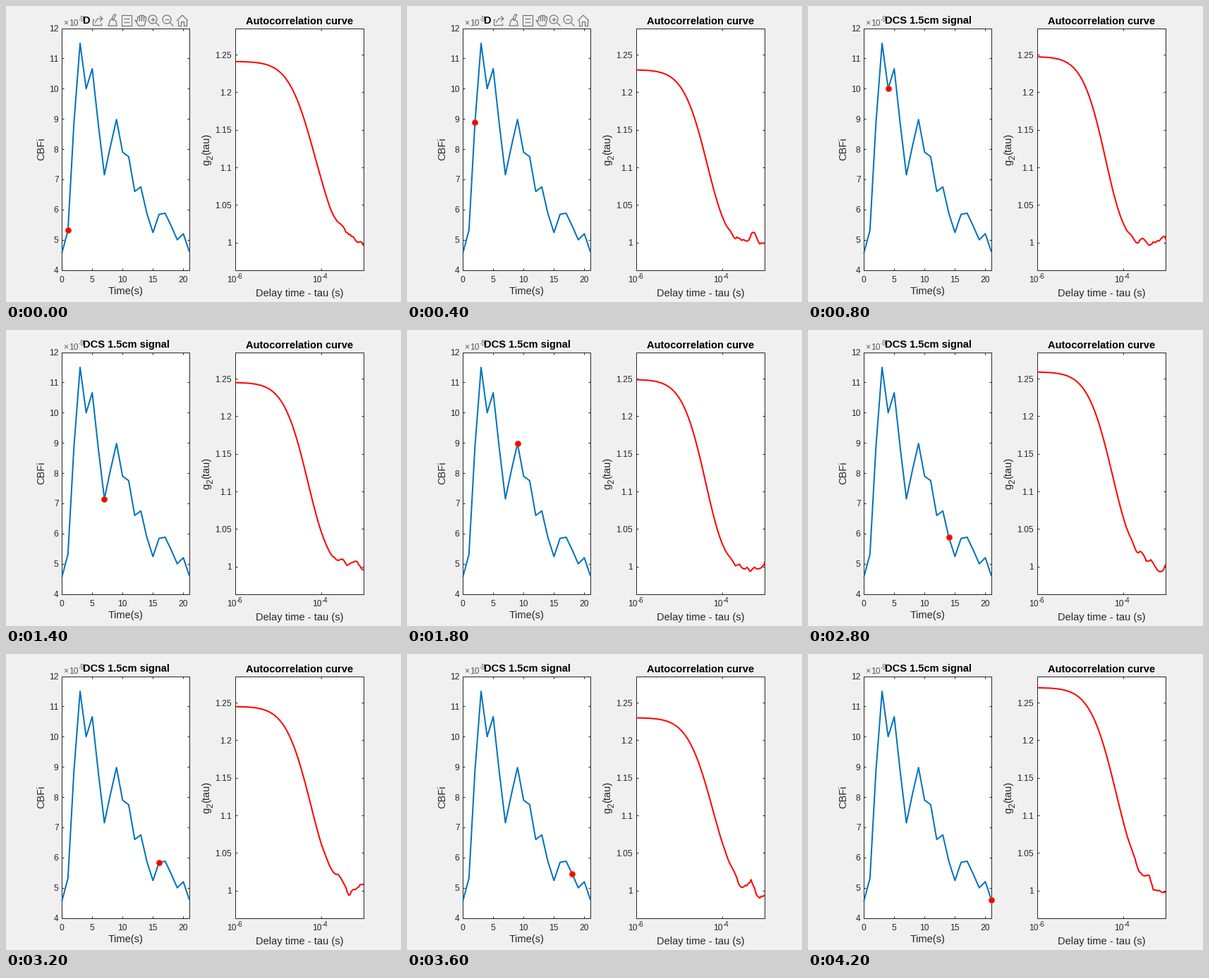
A matplotlib script that plays this animation: 560x420 px, repeating every 4400 ms.

```python
import numpy as np
import matplotlib.pyplot as plt
from matplotlib.animation import FuncAnimation
from matplotlib.patches import Circle, Rectangle

W, H, DPI = 560, 420, 100
PX = 72 / DPI  # points per pixel
STEPS, STEP_MS = 22, 200
GRAY, INK, ICON = "#f0f0f0", "#262626", "#737373"
BLUE, ORANGE = (0, 0.447, 0.741), (0.85, 0.325, 0.098)

plt.rcParams["font.family"] = "Liberation Sans"
plt.rcParams["text.kerning_factor"] = 6
fig = plt.figure(figsize=(W / DPI, H / DPI), dpi=DPI, facecolor=GRAY)
ax = fig.add_axes([0, 0, 1, 1])
ax.set(xlim=(0, W), ylim=(H, 0))
ax.axis("off")

TOP, BOTTOM = 31.6, 374.6

# Blood flow per second, and the contrast of each second's correlation curve
FLOW = np.array([4.56, 5.31, 8.9, 11.5, 10.0, 10.66, 8.82, 7.15, 8.1, 8.98, 7.9,
                 7.75, 6.6, 6.75, 5.87, 5.24, 5.84, 5.88, 5.46, 5.0, 5.2, 4.6])
BETA = np.array([0.24, 0.241, 0.23, 0.25, 0.2475, 0.24, 0.251, 0.245, 0.246, 0.249, 0.242,
                 0.244, 0.285, 0.25, 0.259, 0.26, 0.245, 0.229, 0.23, 0.226, 0.239, 0.27])

# Multi-tau delays in microseconds: eight per octave
TAU = np.concatenate([np.arange(1, 16)]
                     + [np.arange(8, 16) * 2 ** k for k in range(1, 7)] + [[1000]])


def time_x(t):
    return 79.2 + 8.61 * t


def flow_y(v):
    return BOTTOM - (v - 4) * (BOTTOM - TOP) / 8


def tau_x(us):
    return 325.3 + 60.6 * np.log10(us)


def g2_y(v):
    return 335.8 - (v - 1) * 1067


def g2_curve(t):
    """Decay that is faster for higher flow, with noise at long delays."""
    u = np.log(TAU / 37.7)
    rate = 0.079 * FLOW[t] * (1 - 0.16 * np.exp((1 - t) / 2))
    decay = BETA[t] * np.exp(-rate * np.exp(1.243 * u - 0.147 * u ** 2))
    noise = np.random.default_rng(t).normal(0, 0.006, len(TAU))
    noise = np.convolve(noise, np.array([1, 2, 3, 2, 1]) / 19 ** 0.5, "same")
    return 1 + decay + noise * np.clip((np.log10(TAU) - 2) / 0.6, 0, 1)


def line(xs, ys, color=INK, width=1, **kw):
    kw.setdefault("solid_capstyle", "butt")
    return ax.plot(xs, ys, color=color, lw=width * PX, **kw)[0]


def label(x, y, s, size=12, ha="center", color=INK, **kw):
    return ax.text(x, y, s, fontsize=size * PX, ha=ha, va="baseline", color=color,
                   rotation_mode="anchor", **kw)


def panel(x0, x1, xticks, yticks, pad):
    ax.add_patch(Rectangle((x0, TOP), x1 - x0, BOTTOM - TOP, fc="white", ec=INK,
                           lw=PX, joinstyle="miter", zorder=1))
    for x in xticks:
        line([x, x], [BOTTOM, BOTTOM - 3])
        line([x, x], [TOP, TOP + 3])
    for y, s in yticks:
        line([x0, x0 + 3], [y, y])
        line([x1, x1 - 3], [y, y])
        label(x0 - pad, y + 4.5, s, ha="right")


def power(x, y, exponent, color=INK):
    label(x, y, "10", ha="left", color=color)
    label(x + 13.4, y - 5.5, exponent, 9.6, ha="left", color=color)


# Left panel
seconds = range(0, 21, 5)
panel(79, 260, [time_x(t) for t in seconds],
      [(flow_y(v), str(v)) for v in range(4, 13)], 4.4)
for t in seconds:
    label(time_x(t), 391.5, str(t))
label(81, 27.5, "×", ha="left", color="#595959")
power(89.5, 27.5, "-9", "#595959")
label(170, 25.5, "DCS 1.5cm signal", 14.67, color="black", weight="bold")
label(170, 409, "Time(s)", 14.67)
label(54.6, 202.3, "CBFi", 14.67, rotation=90)

# Right panel
panel(325, 507, [tau_x(1), tau_x(100)],
      [(g2_y(v), f"{v:g}") for v in (1, 1.05, 1.1, 1.15, 1.2, 1.25)], 5)
power(313, 392.5, "-6")
power(434, 392.5, "-4")
label(416, 25.5, "Autocorrelation curve", 14.67, color="black", weight="bold")
label(416, 412, "Delay time - tau (s)", 14.67)
label(288, 226, "g", 14.67, ha="left", rotation=90)
label(293, 217.5, "2", 11.7, ha="left", rotation=90)
label(288, 211, "(tau)", 14.67, ha="left", rotation=90)

line(time_x(np.arange(STEPS)), flow_y(FLOW), BLUE, 2, zorder=4, solid_joinstyle="round")
g2 = line([], [], "red", 2, zorder=4, solid_joinstyle="round")
dot = line([], [], marker="o", ms=8 * PX, mfc="red", mec=ORANGE, mew=PX, zorder=5)


def make_toolbar():
    cover = Rectangle((120, 11), 140, 19, fc=GRAY, ec="none", zorder=6)
    parts = [ax.add_patch(cover)]

    def stroke(*pts):
        xs, ys = zip(*pts)
        parts.append(line(xs, ys, ICON, 1.2, zorder=7))

    # export
    stroke((125, 19), (123, 19), (123, 27), (135, 27), (135, 24))
    stroke((126, 24), (130, 18), (136, 18))
    stroke((133, 14), (137, 18), (133, 22))
    # brush
    stroke((156, 12), (153, 19), (150, 18), (153, 12), (156, 12))
    stroke((148, 19), (156, 21), (157, 28), (145, 28), (148, 19))
    # data tip
    stroke((164, 13), (178, 13), (178, 28), (164, 28), (164, 13))
    for y in (18, 23):
        stroke((167, y), (175, y))
    # hand
    for i, tip in enumerate((15, 13, 13, 15)):
        x = 186 + 3 * i
        stroke((x, 21), (x, tip), (x + 3, tip), (x + 3, 21))
    stroke((186, 22), (183, 20), (188, 28), (196, 28), (198, 21))
    # zoom in and out
    for x in (208, 228):
        ring = Circle((x, 19), 6, fc="none", ec=ICON, lw=1.2 * PX, zorder=7)
        parts.append(ax.add_patch(ring))
        stroke((x + 4.5, 23.5), (x + 9.5, 28.5))
        stroke((x - 3, 19), (x + 3, 19))
    stroke((208, 16), (208, 22))
    # home
    stroke((242, 21), (250, 13), (258, 21))
    stroke((244, 20), (244, 28), (248, 28), (248, 22), (252, 22), (252, 28),
           (256, 28), (256, 20))
    return parts


toolbar = make_toolbar()


def draw(k):
    t = max(k, 1)
    g2.set_data(tau_x(TAU), g2_y(g2_curve(t)))
    dot.set_data([time_x(t)], [flow_y(FLOW[t])])
    alpha = 1 if k < 3 else 0.35 if k == 3 else 0
    for part in toolbar:
        part.set_alpha(alpha)
    return [g2, dot, *toolbar]


anim = FuncAnimation(fig, draw, frames=STEPS, init_func=lambda: draw(0),
                     interval=STEP_MS, repeat=True, repeat_delay=0)
plt.show()
```
